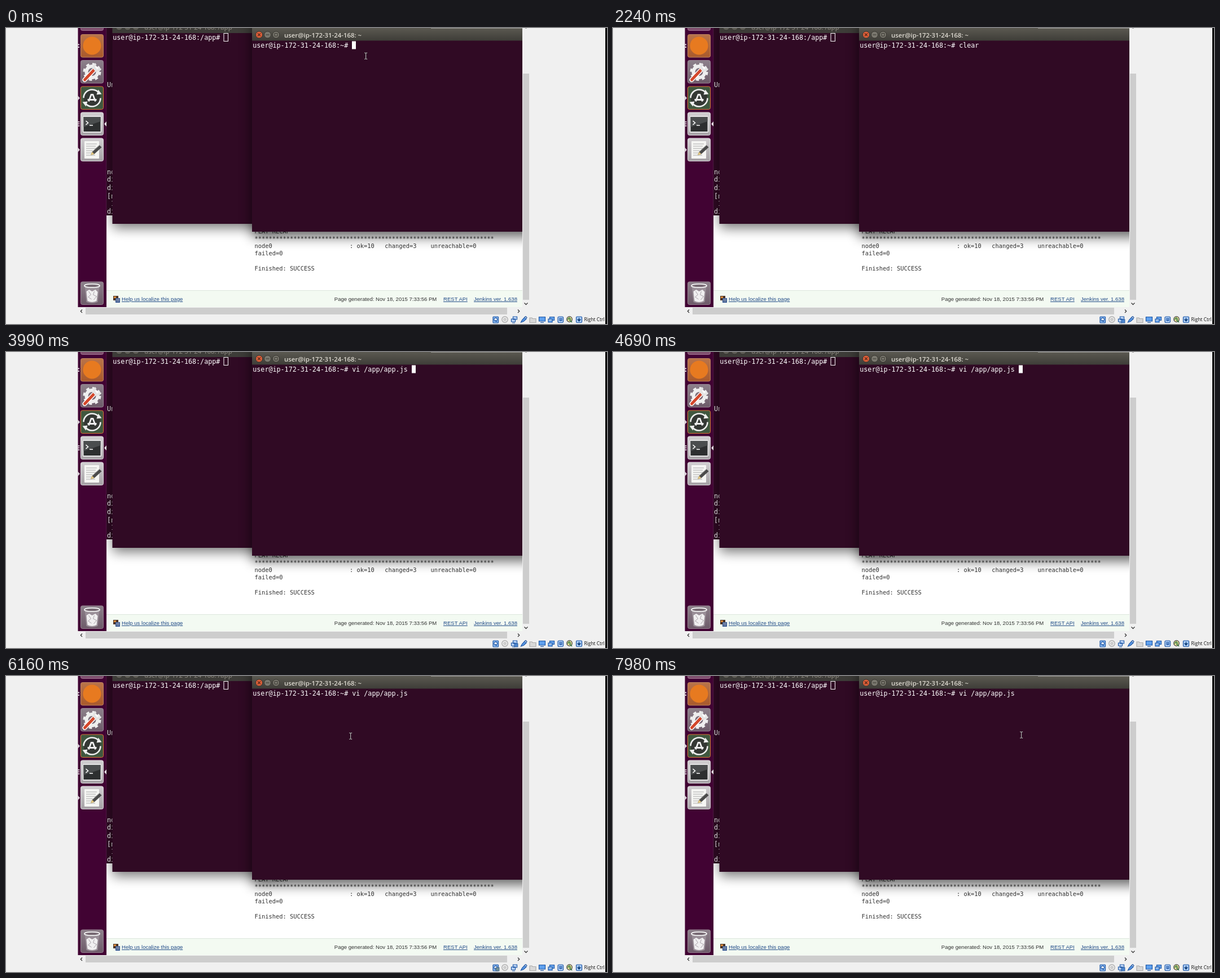
An HTML page for the animation above (8 s loop, 1065x526 px).

```html
<!DOCTYPE html>
<html lang="en">
<head>
<meta charset="utf-8">
<title>Terminal session</title>
<style>
  html, body { margin: 0; width: 100%; height: 100%; overflow: hidden; background: #f0f0f0; }
  svg { display: block; }
  text { white-space: pre; }
  .term { font: 11.7px "DejaVu Sans Mono", monospace; fill: #fff; }
  .log { font: 10.37px "DejaVu Sans Mono", monospace; fill: #333; }
  .foot { font: 9.55px "Liberation Sans", Arial, sans-serif; fill: #333; }
  .link { fill: #204a87; text-decoration: underline; }
  .title { font: 600 11.4px "Open Sans", "Noto Sans", sans-serif; fill: #dfdbd2; }
  .host { font: 8.4px "Open Sans", "Noto Sans", sans-serif; fill: #111; }
</style>
</head>
<body>
<svg id="stage" width="1065" height="526" viewBox="0 0 1065 526">
  <defs>
    <linearGradient id="bar" x2="0" y2="1">
      <stop offset="0" stop-color="#5b5951"/><stop offset="1" stop-color="#3e3d38"/>
    </linearGradient>
    <linearGradient id="silver" x2="0" y2="1">
      <stop offset="0" stop-color="#d2d0d2"/><stop offset="1" stop-color="#a5a1a5"/>
    </linearGradient>
    <linearGradient id="slate" x2="0" y2="1">
      <stop offset="0" stop-color="#8d818b"/><stop offset="1" stop-color="#6d5b69"/>
    </linearGradient>
    <linearGradient id="rust" x2="0" y2="1">
      <stop offset="0" stop-color="#b9744a"/><stop offset="1" stop-color="#a95a2c"/>
    </linearGradient>
    <filter id="blur" x="-20%" y="-20%" width="140%" height="140%"><feGaussianBlur stdDeviation="11"/></filter>
    <clipPath id="view"><rect x="127.500" y="0" width="787.500" height="496"/></clipPath>
    <clipPath id="strip"><rect x="178" y="0" width="11" height="333"/></clipPath>
    <clipPath id="back"><rect x="188.500" y="0" width="247.500" height="348"/></clipPath>
  </defs>

  <rect width="1065" height="526" fill="#f0f0f0"/>
  <rect x="1062" width="3" height="526" fill="#000"/>

  <g clip-path="url(#view)">
    <rect x="178" width="737" height="496" fill="#fff"/>
    <g id="log"></g>
    <rect x="178" y="466" width="737" height="30" fill="#f3faf2"/>
    <path d="M178 466.500H915" stroke="#dde6dc"/>
    <rect x="190" y="476" width="9" height="8" fill="#4a3326"/>
    <rect x="191" y="477" width="4" height="3" fill="#d98b3a"/>
    <rect x="194" y="480" width="8" height="8" fill="#2c4f8c"/>
    <path d="M195 482h6M195 485h6" stroke="#e3d9cf"/>
    <text class="foot link" x="205" y="485">Help us localize this page</text>
    <text class="foot" x="581.800" y="485">Page generated: Nov 18, 2015 7:33:56 PM</text>
    <text class="foot link" x="775" y="485">REST API</text>
    <text class="foot link" x="829" y="485">Jenkins ver. 1.638</text>

    <rect x="178" width="258" height="333" fill="#300a24"/>
    <g id="strip-text" clip-path="url(#strip)"></g>
    <rect x="189" y="-10" width="300" height="365" fill="#000" opacity=".55" filter="url(#blur)"/>

    <rect x="188.500" width="247.500" height="348" fill="#300a24"/>
    <g clip-path="url(#back)">
      <rect x="188" width="248" height="9" fill="#3d3c38"/>
      <g fill="#605e57" stroke="#33322e">
        <circle cx="200.500" cy="-2" r="6"/><circle cx="215.500" cy="-2" r="6"/><circle cx="230" cy="-2" r="6"/>
      </g>
      <text class="title" x="245" y="3" style="fill:#807d75">user@ip-172-31-24-168: /app</text>
      <text class="term" x="189.300" y="21">user@ip-172-31-24-168:/app# </text>
      <rect x="386" y="9.500" width="7.500" height="14" fill="none" stroke="#fff"/>
    </g>
    <rect x="436" y="-10" width="500" height="381" fill="#000" opacity=".62" filter="url(#blur)"/>

    <rect x="436" width="479" height="362" fill="#300a24"/>
    <rect x="436" width="479" height="22.500" fill="url(#bar)"/>
    <path d="M753 .4H915" stroke="#b7b6b1" stroke-width=".8"/>
    <circle cx="448.500" cy="12" r="6" fill="#e0603a" stroke="#37322c"/>
    <path d="M446 9.500l5 5m0-5l-5 5" stroke="#55281a" stroke-width="1.300"/>
    <g fill="#7a786f" stroke="#37352f">
      <circle cx="463.500" cy="12" r="6"/><circle cx="478.500" cy="12" r="6"/>
      <path d="M460.500 12h6M476 9.500h5v5h-5z" fill="none"/>
    </g>
    <text class="title" x="493" y="16.500">user@ip-172-31-24-168: ~</text>
    <text class="term" id="line" x="437.300" y="35"></text>
    <rect id="caret" y="23.500" width="7" height="14" fill="#fff"/>
    <g id="mouse" fill="none">
      <path d="M-2.500 -5.500h5M0 -5.500v11M-2.500 5.500h5" stroke="#000" stroke-width="2.200" opacity=".5"/>
      <path d="M-2.500 -5.500h2l.5 .5l.5-.5h2M0 -5v10M-2.500 5.500h2l.5-.5l.5 .5h2" stroke="#ddd"/>
    </g>

    <rect x="127" width="51" height="496" fill="#410333"/>
    <path d="M177.700 0V496" stroke="#5b2a50" stroke-width=".6"/>
    <g id="tiles"></g>

    <circle cx="152.500" cy="31.500" r="16" fill="#e77a20"/>

    <g transform="translate(152.500 78)">
      <circle r="10" fill="none" stroke="#eee" stroke-width="6"/>
      <circle r="14" fill="none" stroke="#eee" stroke-width="4" stroke-dasharray="5.500 5.495"/>
      <path d="M-13 14L6 -6" stroke="#fff" stroke-width="8" stroke-linecap="round"/>
      <path d="M-13 14L3 -3" stroke="#d3472b" stroke-width="5" stroke-linecap="round"/>
      <path d="M4 -4l3-3M7 -14a6 6 0 1 0 8 8" stroke="#e4e4e4" stroke-width="4" fill="none"/>
    </g>

    <g transform="translate(152.500 124.500)">
      <circle r="15" fill="#343834" stroke="#eee" stroke-width="2.600" stroke-dasharray="39 8.120"/>
      <path d="M11 -15l6 8l-9 1zM-11 15l-6-8l9-1z" fill="#eee"/>
      <path d="M-6 6L-1.500 -6h3L6 6M-8 3H8" stroke="#eee" stroke-width="2.800" fill="none"/>
    </g>

    <rect x="135.500" y="156" width="34" height="30" rx="2" fill="#e4e4e4"/>
    <rect x="137.500" y="158" width="30" height="26" fill="#2d2f30"/>
    <path d="M137.500 158h30v8l-30 10z" fill="#4a4d4e"/>
    <path d="M141.500 165l4 3.500l-4 3.500M148 173h6" stroke="#fff" stroke-width="1.600" fill="none"/>

    <rect x="139" y="201" width="26" height="31" rx="1" fill="#f5f5f3"/>
    <path d="M142 206h19M142 210h17M142 214h19M142 218h12M142 222h10M142 226h16" stroke="#aaa"/>
    <path d="M150 226l2.500-6l13-12l4 4l-13 12z" fill="#4b4b4b"/>
    <path d="M150 226l2.500-6l4 4z" fill="#e3c77f"/>
    <path d="M153 220l13-12" stroke="#9a9a9a"/>

    <g transform="translate(152.500 471)">
      <path d="M-13 -13L-10 16Q0 20 10 16L13 -13z" fill="#9a8f98"/>
      <path d="M-10 -3l5-3l5 3l6-3l4 4l-1 8l-1 8q-8 4-16 0l-1-7z" fill="#f0eff0"/>
      <path d="M-6 -3l4 6l-5 4l6 4M4 -3l-2 6l6 3l-5 6" stroke="#aaa3aa" fill="none"/>
      <ellipse cy="-13" rx="13.500" ry="3.200" fill="#776973" stroke="#f4f4f4" stroke-width="1.800"/>
    </g>

    <g fill="#e5e0e4">
      <path d="M127 28.500h3v2h-3zM127 33h3v2h-3zM127 166h3.500v1.700h-3.500zM127 169.500h3.500v1.700h-3.500zM127 173h3.500v1.700h-3.500z"/>
      <path d="M127 120l4 4.500l-4 4.500zM127 212l4 4.500l-4 4.500zM178 166l-4 4.500l4 4.500z"/>
    </g>
  </g>

  <rect x="916" y="81" width="11" height="402" fill="#cdcdcd"/>
  <rect x="141" y="497" width="747" height="12" fill="#cdcdcd"/>
  <path d="M918.500 488.500l3 3l3-3M135 500.500l-2.700 2.700l2.700 2.700M907 500.500l2.700 2.700l-2.700 2.700" fill="none" stroke="#404040" stroke-width="1.400"/>
  <path d="M920 0h3" stroke="#555"/>

  <g transform="translate(0 518)" fill="none" stroke="#1d56a5" stroke-width="1.200">
    <rect x="863" y="-5" width="9.500" height="11" rx="1" fill="#8fbcf2"/>
    <circle cx="867.700" cy="0" r="2.800" fill="#fff"/><path d="M867 1l3 3"/>
    <circle cx="884" r="5.300" fill="#e4e4e4" stroke="#aaa"/><circle cx="884" r="1.500" fill="#fff" stroke="#aaa"/>
    <path d="M898.500 -5h7v5h-7zM895.500 -1h7v5h-7zM897 6h5" fill="#c2dafa"/>
    <path d="M912.500 5l2-4l4.500-5l3 3l-5 4.500z" fill="#5b99e6"/><path d="M919 -4l2-1.500l2 2l-1.500 2" fill="#ddd"/>
    <path d="M928 -3h4l1 1.500h6v7h-11z" fill="#d8d8d8" stroke="#aaa"/>
    <path d="M944.500 -4.500h11v7.500h-11z" fill="#5ea0ee"/><path d="M947 5.300h6"/>
    <path d="M963.500 -4.500h8v6h-8zM961 -1h7v6h-7z" fill="#6aa6ee"/><path d="M962 1h5" stroke="#fff"/>
    <rect x="978" y="-5" width="9.500" height="10.500" rx="2" fill="#b4d2f8"/><path d="M981 -3v5h4v-5M983 -3v6"/>
    <circle cx="998.500" cy="-.5" r="4.800" fill="#e6dc96" stroke="#444"/><path d="M995 0l3-3l3 3M998 0l5 5" stroke="#27733c" stroke-width="1.500"/>
    <rect x="1010.500" y="-5" width="10" height="10.500" rx="1.500" fill="#a9cbf5"/><path d="M1015.500 -3v4M1013 0l2.500 3l2.500-3z" stroke="#123f78" fill="#174d8f"/>
  </g>
  <rect id="disk" x="868" y="518" width="6" height="6" fill="#6f8f97" stroke="#345a86" stroke-width=".8"/>
  <rect id="net" x="901" y="518" width="6" height="6" fill="#4d87d0" stroke="#1d4f94" stroke-width=".8"/>
  <text class="host" x="1024.500" y="521.300">Right Ctrl</text>
</svg>

<script>
const LOOP = 8000, STEP = 70, CELL = 7.04, LEFT = 437;
const PROMPT = 'user@ip-172-31-24-168:~# ';
const $ = id => document.getElementById(id);

function add(parent, tag, attrs, content = '') {
  const el = document.createElementNS('http://www.w3.org/2000/svg', tag);
  for (const key in attrs) el.setAttribute(key, attrs[key]);
  el.textContent = content;
  $(parent).append(el);
}

const logLines = [
  [365, 'PLAY RECAP'],
  [378, '*'.repeat(68)],
  [391, 'node0' + ' '.repeat(22) + ': ok=10   changed=3    unreachable=0'],
  [404, 'failed=0'],
  [431, 'Finished: SUCCESS']
];
for (const [y, s] of logLines) add('log', 'text', { class: 'log', x: 440.6, y }, s);

const edgeLines = [[105, 'Un'], [260, 'no'], [273, 'di'], [288, 'di'], [303, '[n'], [316, ' 1'], [330, 'di']];
for (const [y, s] of edgeLines) add('strip-text', 'text', { class: 'term', x: 179, y }, s);

const tiles = [
  [-36, '#80506f', '#a0718f'], [11.5, 'url(#rust)', '#bd8561'], [57.5, 'url(#slate)', '#9b8a97'],
  [104, '#40573f', '#d97a35'], [150, 'url(#silver)', '#dedbde'],
  [196, 'url(#silver)', '#dedbde'], [451, 'url(#slate)', '#95808f']
];
for (const [y, fill, stroke] of tiles)
  add('tiles', 'rect', { x: 132.5, y, width: 40, height: 40.5, rx: 3, fill, stroke });

// Command line contents by start time.
const commands = [
  [0, ''], [1050, 'clear'], [2310, 'vi /app/config-sample.json '], [3990, 'vi /app/app.js ']
];
// The caret starts visible and flips at each of these times.
const flips = [420, 840, 1470, 1610, 2030, 2520, 3430, 3920, 4410, 4690, 5110, 5600, 6090, 6510, 6930, 7420, 7910];
const netBusy = [[840, 910], [1050, 1190], [1470, 1610], [2240, 2380], [2940, 3010],
  [3920, 4060], [4410, 4480], [4550, 4690], [7980, LOOP]];
const diskBusy = [[2030, 2100], [6090, 6300]];
// Pointer path: time, x, y.
const path = [
  [5600, 670, 41], [5670, 670, 41], [5810, 560, 82], [5950, 443, 122], [6020, 480, 120],
  [6160, 611, 107], [6370, 611, 107], [6510, 611, 121], [6580, 611, 121], [6650, 612, 120],
  [6860, 612, 120], [6930, 614, 120], [7000, 614, 120], [7210, 554, 124],
  [7420, 742, 171], [7490, 742, 171], [7980, 724, 105]
];

const during = (spans, t) => spans.some(([a, b]) => t >= a && t < b);
const show = (id, on) => $(id).setAttribute('visibility', on ? 'visible' : 'hidden');

function pointer(t) {
  if (t < 840) return [638, 50];
  if (t < path[0][0]) return null;
  const i = path.findIndex(p => p[0] >= t);
  if (i < 1) return path[i < 0 ? path.length - 1 : 0].slice(1);
  const [t0, x0, y0] = path[i - 1], [t1, x1, y1] = path[i];
  const k = (t - t0) / (t1 - t0);
  return [Math.round(x0 + (x1 - x0) * k), Math.round(y0 + (y1 - y0) * k)];
}

function draw(ms) {
  const t = Math.floor(ms % LOOP / STEP) * STEP;
  const line = PROMPT + commands.filter(c => c[0] <= t).pop()[1];
  if ($('line').textContent !== line) $('line').textContent = line;
  $('caret').setAttribute('x', Math.round(LEFT + line.length * CELL));
  show('caret', flips.filter(f => f <= t).length % 2 === 0);
  const at = pointer(t);
  show('mouse', at);
  if (at) $('mouse').setAttribute('transform', `translate(${at[0] - 0.3} ${at[1] - 0.3})`);
  show('net', during(netBusy, t));
  show('disk', during(diskBusy, t));
}

const start = performance.now();
function tick() {
  draw(performance.now() - start);
  requestAnimationFrame(tick);
}
tick();
</script>
</body>
</html>
```
